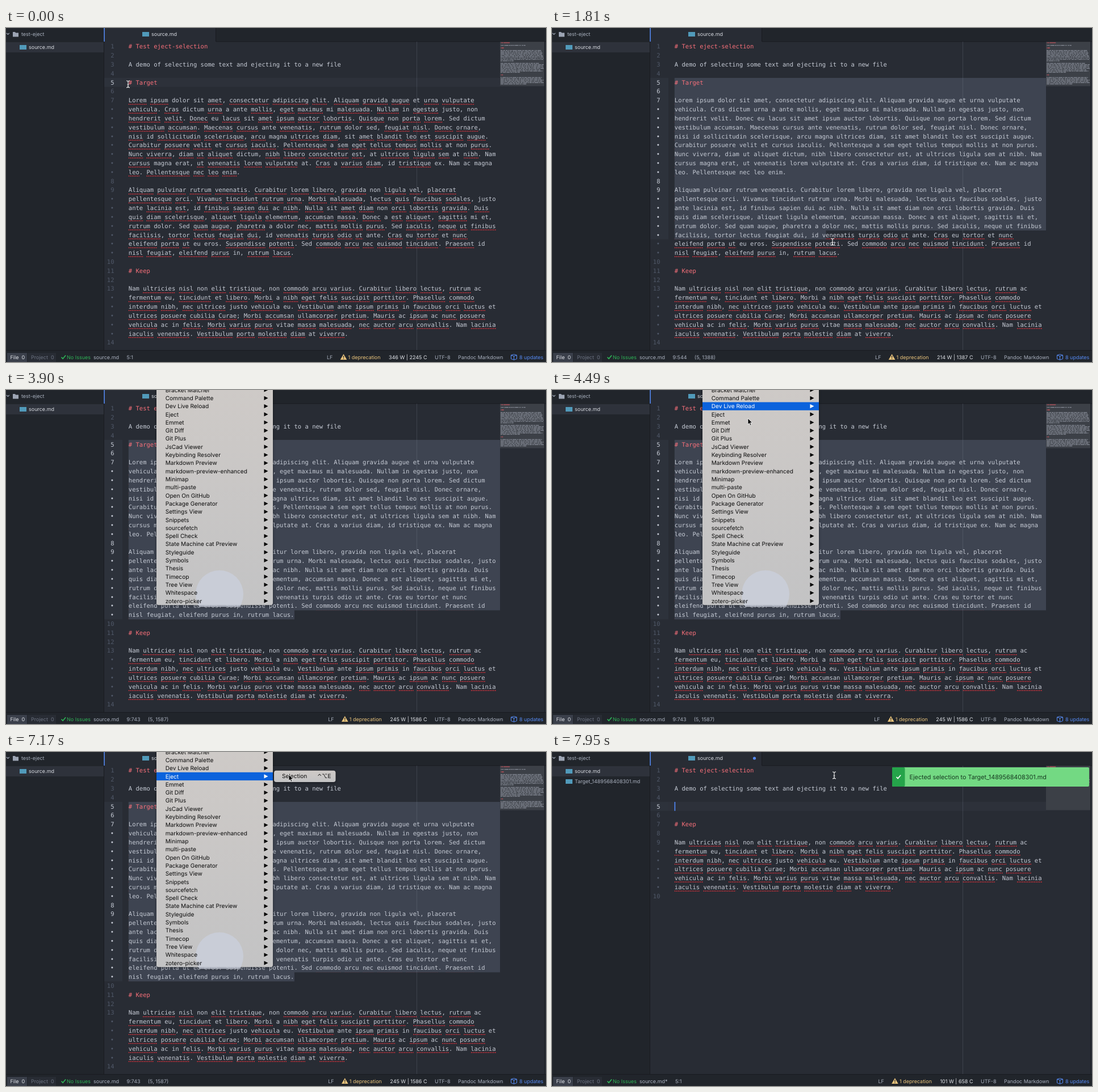
Animation of 951x589 px, one loop 8 s. Source, as an HTML page:

```html
<!DOCTYPE html>
<html lang="en">
<head>
<meta charset="utf-8">
<title>Eject selection</title>
<style>
html, body { margin: 0; width: 100%; height: 100%; overflow: hidden; background: #282c34; }
svg { display: block; width: 951px; height: 589px; }
text { white-space: pre; font: 9px Inter, "DejaVu Sans", sans-serif; fill: #a9b0be; text-rendering: geometricPrecision; }
.code text { font: 10.548px "DejaVu Sans Mono", "Liberation Mono", monospace; fill: #c6cbd5; }
.code .head { fill: #f8707a; }
.code .num { fill: #505868; text-anchor: end; }
.code .num.on { fill: #c6cbd5; }
.menu text { font-size: 10.1px; fill: #0c0c0c; }
.menu .key { text-anchor: end; }
.menu .hot text { fill: #fff; }
.menu .hot .tip { fill: #fff; }
.menu .bar { fill: none; }
.menu .hot .bar { fill: #0b62dc; }
.menu { filter: drop-shadow(0 1px 2px rgba(0,0,0,.4)); }
.bright { fill: #e2e5ea; }
</style>
</head>
<body>
<svg id="stage" viewBox="0 0 951 589"></svg>
<script>
const LOOP = 8000, LEFT = 215.8, TOP = 24.7, ROW = 15.82, CHAR = 6.35, ITEM = 14.31;

const intro = ['# Test eject-selection', '', 'A demo of selecting some text and ejecting it to a new file', ''];
const target = ['# Target', '',
`Lorem ipsum dolor sit amet, consectetur adipiscing elit. Aliquam gravida augue et urna vulputate
vehicula. Cras dictum urna a ante mollis, eget maximus mi malesuada. Nullam in egestas justo, non
hendrerit velit. Donec eu lacus sit amet ipsum auctor lobortis. Quisque non porta lorem. Sed dictum
vestibulum accumsan. Maecenas cursus ante venenatis, rutrum dolor sed, feugiat nisl. Donec ornare,
nisi id sollicitudin scelerisque, arcu magna ultrices diam, sit amet blandit leo est suscipit augue.
Curabitur posuere velit et cursus iaculis. Pellentesque a sem eget tellus tempus mollis at non purus.
Nunc viverra, diam ut aliquet dictum, nibh libero consectetur est, at ultrices ligula sem at nibh. Nam
cursus magna erat, ut venenatis lorem vulputate at. Cras a varius diam, id tristique ex. Nam ac magna
leo. Pellentesque nec leo enim.`, '',
`Aliquam pulvinar rutrum venenatis. Curabitur lorem libero, gravida non ligula vel, placerat
pellentesque orci. Vivamus tincidunt rutrum urna. Morbi malesuada, lectus quis faucibus sodales, justo
ante lacinia est, id finibus sapien dui ac nibh. Nulla sit amet diam non orci lobortis gravida. Duis
quis diam scelerisque, aliquet ligula elementum, accumsan massa. Donec a est aliquet, sagittis mi et,
rutrum dolor. Sed quam augue, pharetra a dolor nec, mattis mollis purus. Sed iaculis, neque ut finibus
facilisis, tortor lectus feugiat dui, id venenatis turpis odio ut ante. Cras eu tortor et nunc
eleifend porta ut eu eros. Suspendisse potenti. Sed commodo arcu nec euismod tincidunt. Praesent id
nisl feugiat, eleifend purus in, rutrum lacus.`];
const keep = ['', '# Keep', '',
`Nam ultricies nisl non elit tristique, non commodo arcu varius. Curabitur libero lectus, rutrum ac
fermentum eu, tincidunt et libero. Morbi a nibh eget felis suscipit porttitor. Phasellus commodo
interdum nibh, nec ultrices justo vehicula eu. Vestibulum ante ipsum primis in faucibus orci luctus et
ultrices posuere cubilia Curae; Morbi accumsan ullamcorper pretium. Mauris ac ipsum ac nunc posuere
vehicula ac in felis. Morbi varius purus vitae massa malesuada, nec auctor arcu convallis. Nam lacinia
iaculis venenatis. Vestibulum porta molestie diam at viverra.`, ''];
const known = new Set('a ac ante at dictum dolor erat eros et eu ex id in justo magna mi nam non sed sit vitae'.split(' '));

const packages = ['Bracket Matcher', 'Command Palette', 'Dev Live Reload', 'Eject', 'Emmet', 'Git Diff', 'Git Plus',
  'JsCad Viewer', 'Keybinding Resolver', 'Markdown Preview', 'markdown-preview-enhanced', 'Minimap', 'multi-paste',
  'Open On GitHub', 'Package Generator', 'Settings View', 'Snippets', 'sourcefetch', 'Spell Check',
  'State Machine cat Preview', 'Styleguide', 'Symbols', 'Thesis', 'Timecop', 'Tree View', 'Whitespace', 'zotero-picker'];
const emmet = ['Expand Abbreviation|⇧⌘E', 'Wrap with Abbreviation|⇧⌘A', 'Balance (outward)|⌃D', 'Balance (inward)|⇧⌃D',
  'Go to Matching Pair|⌃⌥J', 'Next Edit Point|⌃⌥→', 'Previous Edit Point|⌃⌥←', 'Select Next Item|⇧⌘.',
  'Select Previous Item|⇧⌘,', 'Toggle Comment', 'Split/Join Tag|⇧⌘J', "Remove Tag|⌘'", 'Update Image Size|⇧⌃I',
  'Evaluate Math Expression|⇧⌘Y', 'Reflect CSS Value|⇧⌘R', 'Encode/Decode Image to data:URL|⇧⌃D'];

const text = (x, y, s, attr = '') => `<text x="${x}" y="${y}" ${attr}>${s}</text>`;
const rect = (x, y, w, h, fill, attr = '') =>
  `<rect x="${x}" y="${y}" width="${w}" height="${h}" ${fill ? `fill="${fill}"` : ''} ${attr}/>`;
const group = (id, body, attr = '') => `<g id="${id}" ${attr}>${body}</g>`;
const tick = (x, y, color) => `<path d="M${x} ${y}l2.6 2.7 5-6" fill="none" stroke="${color}" stroke-width="1.7"/>`;
const fileIcon = (x, y) => rect(x, y - 4, 12, 8, '#519aba');
const rowMid = r => TOP + ROW * (r + .5);

// Splits buffer lines into screen rows
function wrap(lines) {
  return lines.flatMap((line, i) => {
    let col = 0;
    return line.split('\n').map((s, k) => {
      const row = { s, line: i + 1, col, wrapped: k > 0 };
      col += s.length + 1;
      return row;
    });
  });
}

function drawDoc(id, rows) {
  let squiggle = '', map = '', mapHead = '', front = '';
  rows.forEach(({ s, line, wrapped }, r) => {
    const mid = rowMid(r), head = s[0] === '#';
    front += text(wrapped ? 190 : 190.5, mid + 3.7, wrapped ? '•' : line, 'class="num"');
    front += text(LEFT, mid + 3.7, s, head ? 'class="head"' : '');
    for (const m of s.matchAll(/\S+/g)) {
      const dash = `M${871 + m.index * .745} ${26 + r * 2.27}h${m[0].length * .745 - .2}`;
      if (head) mapHead += dash; else map += dash;
      const word = m[0].replace(/[^a-z]/gi, '');
      if (line > 4 && !head && !known.has(word.toLowerCase()))
        squiggle += `M${LEFT + m.index * CHAR} ${mid + 6.9}h${word.length * CHAR}`;
    }
  });
  const line = (d, color, w, extra = '') => `<path d="${d}" fill="none" stroke="${color}" stroke-width="${w}" ${extra}/>`;
  return {
    back: group(id + 'Back', line(squiggle, '#ea333c', 1.5, 'stroke-dasharray="1.6 1.4"')),
    front: group(id + 'Front', front + line(map, '#a3a9b5', 1.2, 'opacity=".75"') + line(mapHead, '#d9545e', 1.2), 'class="code"')
  };
}

function drawMenu(id, x, top, w, pad, items, arrows, back = '') {
  const body = items.map((item, i) => {
    const [name, key] = item.split('|'), mid = top + pad + ITEM * (i + .5);
    return `<g class="item">${rect(x, mid - ITEM / 2, w, ITEM, '', 'class="bar"')}` +
      text(x + (arrows ? 15.7 : 14), mid + 3.6, name) + (key ? text(x + w - 8, mid + 3.6, key, 'class="key"') : '') +
      (arrows ? `<path class="tip" d="M${x + 189.5} ${mid - 3.6}l7 3.6-7 3.6z"/>` : '') + '</g>';
  }).join('');
  return group(id, rect(x, top, w, items.length * ITEM + 2 * pad, 'url(#glass)', 'rx="4"') + back + body, 'class="menu"');
}

const before = wrap([...intro, ...target, ...keep]);
const after = wrap([...intro, '', ...keep]);
const docA = drawDoc('a', before), docB = drawDoc('b', after);
const first = 4, last = before.findIndex(r => r.s.startsWith('nisl feugiat'));

const chrome = rect(0, 0, 951, 589, '#282c34') +
  rect(0, 0, 172, 568, '#21252b') + rect(0, 25, 172, 18, '#2e323b') +
  rect(173, 0, 778, 24, '#21252b') + rect(173, 0, 196, 24.5, '#282c34') +
  rect(172, 0, 1, 568, '#191b20') + rect(369, 0, 1, 24, '#191b20') + rect(370, 23.5, 581, 1, '#191b20') +
  rect(172.3, 0, 1.6, 24, '#568af2') +
  '<path d="M1 9l2.4 2.5L5.800 9" fill="none" stroke="#9da5b4" stroke-width="1.2"/>' +
  '<path d="M12 7h4l1 1.500h5v7H12z" fill="#9da5b4"/>' +
  text(27, 14.2, 'test-eject') + fileIcon(24, 34) + text(40, 37.2, 'source.md', 'style="fill:#d7dae0"') +
  group('newFile', fileIcon(24, 52) + text(40, 55, 'Target_1489568408301.md')) +
  fileIcon(240, 11) + text(256, 14.2, 'source.md', 'style="fill:#d7dae0"') +
  '<circle id="dot" cx="356.500" cy="11" r="2.600" fill="#568af2"/>';

const status = rect(0, 568, 951, 21, '#21252b') + rect(0, 568, 951, 1, '#191b20') +
  rect(2, 573, 35, 16, '#3a3f4a') + text(7.5, 583.8, 'File  0', 'class="bright"') +
  rect(38, 573, 50, 16, '#282c34') + text(44, 583.8, 'Project  0', 'style="fill:#6b7280"') +
  tick(97.5, 580.5, '#2fb457') + text(107, 583.8, 'No Issues', 'style="fill:#2fb457"') +
  text(154, 583.8, 'source.md', 'id="name"') + text(212, 583.8, '', 'id="pos"') +
  text(250, 583.8, '', 'id="range"') +
  group('shift', text(564.5, 583.8, 'LF') +
    '<path d="M594 575l5.800 10h-11.600z" fill="#eac47c"/><path d="M594 578v3.500m0 1v1.300" stroke="#21252b" stroke-width="1.300"/>' +
    text(602, 583.8, '1 deprecation', 'style="fill:#eac47c"')) +
  text(741.5, 583.8, '', 'id="count" class="bright" text-anchor="end"') +
  text(755, 583.8, 'UTF-8') + text(796, 583.8, 'Pandoc Markdown') +
  '<path d="M889.500 577l5-1.500 5 1.500v6.500l-5 1.800-5-1.800zl5 1.700 5-1.700m-5 1.700v6.500" fill="none" stroke="#568af2"/>' +
  text(904, 583.8, '8 updates', 'style="fill:#568af2"');

const halo = '<circle cx="376" cy="360" r="42" fill="#cbd0dc" opacity=".8" clip-path="url(#menuClip)"/>';
const notice = rect(599, 27, 347, 34, '#73d983', 'rx="2"') + rect(599, 27, 22.5, 34, '#25a44a', 'rx="2"') +
  tick(606.5, 44, '#fff') + text(629.5, 48, 'Ejected selection to Target_1489568408301.md', 'style="font-size:10.8px;fill:#173a20"');

document.getElementById('stage').innerHTML =
  `<defs><linearGradient id="glass" x2="0" y2="1"><stop stop-color="#cecac7"/><stop offset="1" stop-color="#c3c3c4"/></linearGradient>
  <clipPath id="menuClip">${rect(265, 0, 205, 382.5, '#000', 'rx="4"')}</clipPath></defs>` +
  chrome + rect(173, TOP, 32, ROW, '#2d323b', 'id="gutter"') +
  rect(205, TOP + ROW * first, 665, ROW, '#2d313a', 'id="active"') +
  docA.back + docB.back + '<path id="sel" fill="#3e4451"/>' +
  rect(723, 24, 1, 544, '#8b93a3', 'opacity=".22"') +
  rect(870, 24, 78, 78.5, '#fff', 'opacity=".095"') + rect(948, 24, 1, 544, '#1c1f24') +
  docA.front + docB.front + rect(215.6, TOP + ROW * first, 1.6, ROW, '#528bff', 'id="caret"') + status +
  group('notice', notice) +
  drawMenu('main', 265, -ITEM / 2, 205, 0, packages, true, halo) +
  drawMenu('emmet', 472, 47, 222, 3, emmet, false) +
  drawMenu('eject', 472, 32.7, 108.5, 3, ['Selection|⌃⌥E'], false) +
  `<g id="beam"><path d="M-3-6q3 0 3 2v8q0 2-3 2M3-6q-3 0-3 2m0 8q0 2 3 2M-1.500 1h3" fill="none" stroke="#f4f4f4" stroke-width="1.100"/></g>
  <path id="arrow" d="M0 0v10.800l2.500-2.300 1.700 3.900 1.800-.8-1.700-3.800h3.500z" fill="#000" stroke="#fff" stroke-width=".8"/>`;

const el = Object.fromEntries([...document.querySelectorAll('[id]')].map(e => [e.id, e]));
const nums = [...el.aFront.querySelectorAll('.num')];
el.bFront.querySelectorAll('.num')[first].classList.add('on');
const mainItems = [...el.main.querySelectorAll('.item')];
const ejectItem = el.eject.querySelector('.item');

// time, x, y; entries without a place hide the pointer
const beamMoves = [[0, 215, 99], [300, 216, 100], [460, 217, 104], [620, 220, 114], [780, 226, 132], [940, 238, 158],
  [1110, 254, 188], [1270, 432, 315], [1480, 460, 340], [1640, 480, 360], [1800, 494, 377], [1950, 507, 392],
  [2110, 509, 391], [2550, 525, 391], [2700], [7480, 497, 41]];
const arrowMoves = [[0], [4200, 333, 8], [4340, 339, 28], [4490, 345, 50], [4640, 349, 56], [4780, 352, 56],
  [4930, 355, 53], [5080, 356, 47], [5530, 372, 47], [5680, 402, 46], [5830, 436, 44], [5980, 466, 43],
  [6130, 486, 42], [6280, 494, 41], [6430, 497, 40], [6580, 498, 40], [7480]];
// time, highlighted item, open submenu
const menuSteps = [[0], [3900, -1], [4200, 0], [4340, 1], [4490, 2], [4640, 4], [4780, 4, 'emmet'],
  [5080, 3], [5230, 3, 'eject'], [7480]];

const indexAt = (list, t) => list.findLastIndex(s => s[0] <= t);
const show = (e, on) => e.setAttribute('display', on ? 'inline' : 'none');
const endOf = e => +e.getAttribute('x') + e.getComputedTextLength();
function put(e, x, y) {
  show(e, x !== undefined);
  if (x !== undefined) e.setAttribute('transform', `translate(${x} ${y})`);
}

// The selection trails the pointer by one step
function selectionEnd(t) {
  if (t >= 2110) return { r: last, c: before[last].s.length };
  const [, x, y] = beamMoves[Math.max(0, indexAt(beamMoves, t) - 1)];
  const r = Math.max(first, Math.floor((y - TOP) / ROW));
  return { r, c: Math.min(before[r].s.length, Math.max(0, Math.round((x - LEFT) / CHAR))) };
}

function selectedText(r, c) {
  let out = '';
  for (let i = first; i < r; i++) out += before[i].s + (before[i + 1].wrapped ? ' ' : '\n');
  return out + before[r].s.slice(0, c);
}

function drawEditor(t, done) {
  const { r, c } = done ? { r: first, c: 0 } : selectionEnd(t);
  const picked = done ? '' : selectedText(r, c), y = TOP + ROW * first, yEnd = TOP + ROW * r;
  show(el.active, !picked);
  el.gutter.setAttribute('y', y);
  el.gutter.setAttribute('height', ROW * (r - first + 1));
  el.sel.setAttribute('d', picked ? `M${LEFT} ${y}H870V${yEnd}H${LEFT}zM${LEFT} ${yEnd}h${c * CHAR}v${ROW}H${LEFT}z` : '');
  nums.forEach((n, i) => n.classList.toggle('on', i >= first && i <= r));

  const row = before[r];
  el.name.textContent = done ? 'source.md*' : 'source.md';
  el.pos.textContent = done ? '5:1' : `${row.line}:${row.col + c + 1}`;
  el.range.textContent = picked ? `(${row.line - 4}, ${picked.length})` : '';
  el.count.textContent = done ? '101 W | 658 C' : picked
    ? `${picked.trim().split(/\s+/).length} W | ${picked.length - 1} C` : '346 W | 2245 C';
  el.pos.setAttribute('x', endOf(el.name) + 13.3);
  el.range.setAttribute('x', endOf(el.pos) + 13.3);
  put(el.shift, 68 - el.count.getComputedTextLength(), 0);
}

function draw(t) {
  const done = t >= 7640;
  drawEditor(t, done);
  for (const id of ['aBack', 'aFront']) show(el[id], !done);
  for (const id of ['bBack', 'bFront', 'caret', 'dot', 'newFile']) show(el[id], done);

  const [, hot, sub] = menuSteps[indexAt(menuSteps, t)];
  show(el.main, hot !== undefined);
  mainItems.forEach((m, i) => m.classList.toggle('hot', i === hot));
  show(el.emmet, sub === 'emmet');
  show(el.eject, sub === 'eject');

  const [, ax, ay] = arrowMoves[indexAt(arrowMoves, t)];
  const [, bx, by] = beamMoves[indexAt(beamMoves, t)];
  put(el.arrow, ax, ay);
  put(el.beam, bx, by);
  const blink = t >= 7170 && t < 7320;
  ejectItem.classList.toggle('hot', ax >= 472 && !blink);

  put(el.notice, t >= 7800 ? (t < 7950 ? 60 : 0) : undefined, 0);
  el.notice.setAttribute('opacity', t < 7950 ? .7 : 1);
}

function frame() {
  draw(performance.now() % LOOP);
  requestAnimationFrame(frame);
}
frame();
</script>
</body>
</html>
```
